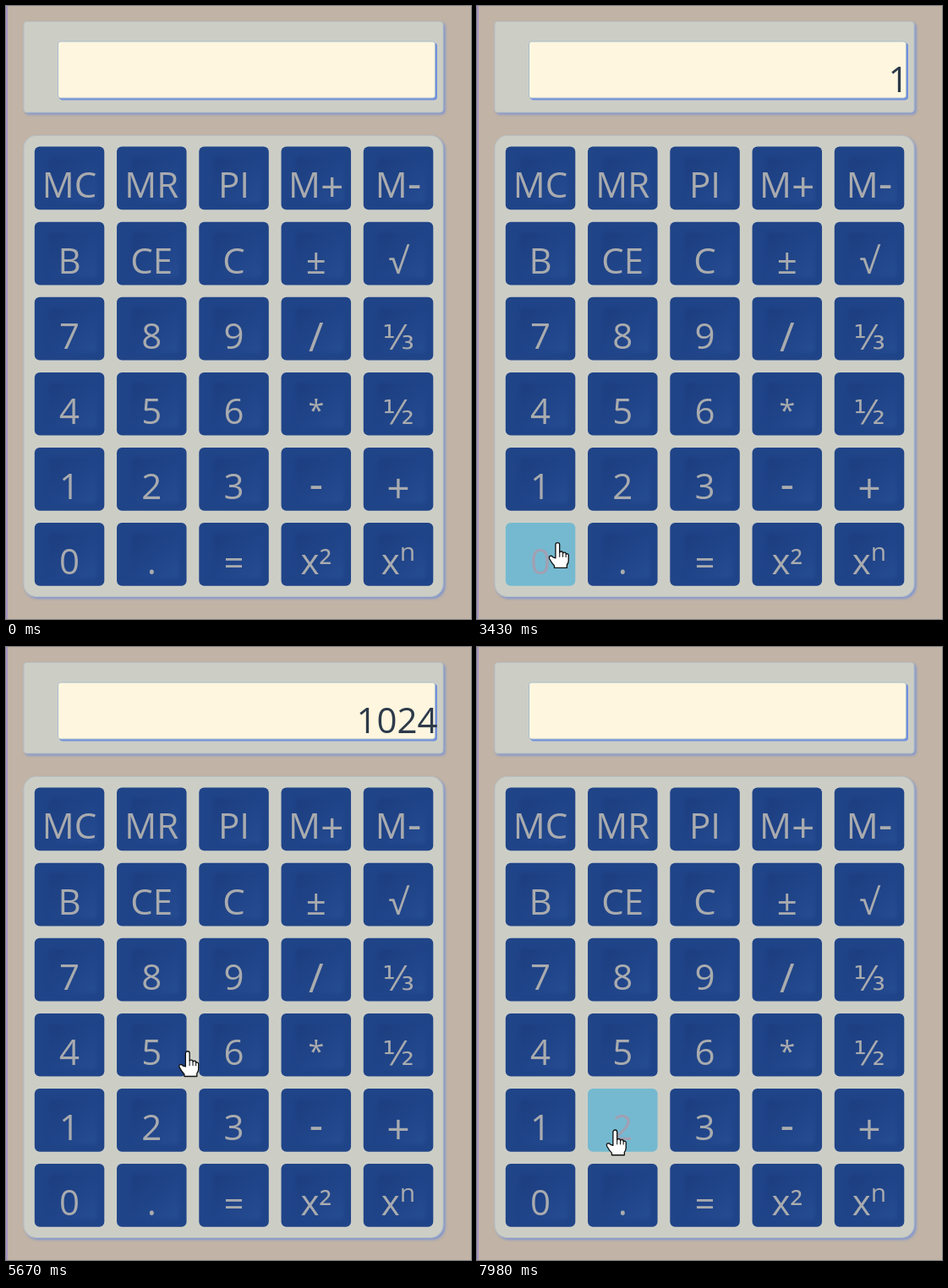
Write an HTML page that moves like this. It is 550 by 726 pixels and loops after 8 s.

```html
<!DOCTYPE html>
<html lang="en">
<head>
<meta charset="utf-8">
<title>Calculator</title>
<style>
  html, body { margin: 0; width: 100%; height: 100%; overflow: hidden; background: #c1b3a5; }
  svg { display: block; width: 100%; height: 100%; font: 42px "Open Sans", "Noto Sans", sans-serif; }
  .panel { fill: #cccec6; stroke: #b9c0c2; stroke-width: 1.2; filter: drop-shadow(2px 2px 1.5px #7f95cf); }
  .field { fill: #fff6df; stroke: #a9bccb; filter: drop-shadow(2px 2px .6px #7290dc); }
  .key { text-anchor: middle; fill: #a9abae; }
  .fraction { font: 39px "DejaVu Sans", sans-serif; }
  .face { fill: #204488; }
  .well { fill: url(#well); filter: blur(2px); }
  .hover { fill: #a29fb2; }
  .hover .face { fill: #75b9d0; }
  .active { fill: #a3b6c6; }
  .active .face { fill: #b1d5e9; filter: drop-shadow(0 0 2px #c3d8e4); }
  .hover .well, .active .well { fill: none; }
</style>
</head>
<body>
<svg viewBox="0 0 550 726" preserveAspectRatio="none">
  <defs>
    <linearGradient id="well" x2="1" y2="1">
      <stop stop-color="#1c3e80"/><stop offset=".5" stop-color="#204488"/><stop offset="1" stop-color="#264c92"/>
    </linearGradient>
  </defs>
  <rect width="550" height="726" fill="#c1b3a5"/>
  <rect width="2" height="726" fill="#a595c3"/>
  <rect class="panel" x="21" y="18.5" width="496" height="107.5" rx="4"/>
  <rect class="panel" x="21" y="153.5" width="496" height="546" rx="15"/>
  <rect class="field" x="61.5" y="42" width="446" height="67" rx="3"/>
  <text id="display" x="510.5" y="101.5" text-anchor="end" fill="#2c3a4a"></text>
  <g id="keys"></g>
  <g id="hand" fill="#fff" stroke="#111" stroke-width="1.4" stroke-linejoin="round">
    <path d="M-2.5 19V2.5a2.5 2.5 0 0 1 5 0V12a2.4 2.4 0 0 1 4 0v1a2.3 2.3 0 0 1 3.8 0v1.3a1.9 1.9 0 0 1 3.2 1.2V22q0 3-2 5.5V31H-4V28.5q-3-3-6-8.5q-1-3 1-3.5t3.5 1.5z"/>
    <path d="M2.5 12v6M6.5 13v5M10.3 14.3v4" stroke-width="1.1"/>
  </g>
</svg>
<script>
const LOOP = 8000, STEP = 70, PRESS = 140;
const KEY_W = 82.5, KEY_H = 74.7;
const $ = id => document.getElementById(id);

const labels = 'MC MR PI M+ M- B CE C ± √ 7 8 9 / ⅓ 4 5 6 * ½ 1 2 3 - + 0 . = x² xn'.split(' ');
// symbols with their own size and vertical shift
const symbols = { '+': [48, 4], '-': [52, 0.5], '/': [48, 3], '*': [34, -4], '=': [42, 1.5], n: [30, -16] };

function setSymbol(char) {
  const [size, dy] = symbols[char];
  return `<tspan font-size="${size}" dy="${dy}">${char}</tspan>`;
}

const keys = labels.map((label, i) => {
  const x = 33.8 + (i % 5) * 97.25, y = 166.6 + Math.floor(i / 5) * 89.1;
  const g = document.createElementNS('http://www.w3.org/2000/svg', 'g');
  const type = /[½⅓]/.test(label) ? 'fraction' : '';
  g.innerHTML =
    `<rect class="face" x="${x}" y="${y}" width="${KEY_W}" height="${KEY_H}" rx="6"/>` +
    `<rect class="well" x="${x + 17}" y="${y + 12}" width="57" height="54" rx="5"/>` +
    `<text class="${type}" x="${x + KEY_W / 2}" y="${y + 60.8}">${label.replace(/[-+/*=n]/, setSymbol)}</text>`;
  $('keys').append(g);
  return { g, label, x, y };
});

// pointer: where it appears, then each glide from depart to arrive
const entry = { time: 840, x: 205, y: 339 };
const glides = [
  { depart: 910, arrive: 1540, x: 205, y: 432 },
  { depart: 1610, arrive: 2450, x: 71, y: 555 },
  { depart: 3080, arrive: 3500, x: 98, y: 642 },
  { depart: 3850, arrive: 4130, x: 157, y: 550 },
  { depart: 4480, arrive: 5040, x: 84, y: 461 },
  { depart: 5460, arrive: 5950, x: 418, y: 506 },
  { depart: 5950, arrive: 6440, x: 365, y: 381 },
  { depart: 7070, arrive: 7980, x: 164, y: 572 }
];
const pressTimes = [2800, 3710, 4200, 5250, 6860];

const smooth = u => u * u * (3 - 2 * u);
const clamp = u => Math.min(1, Math.max(0, u));

function pointerAt(t) {
  let { x, y } = entry;
  for (const g of glides) {
    const k = smooth(clamp((t - g.depart) / (g.arrive - g.depart)));
    x += (g.x - x) * k;
    y += (g.y - y) * k;
  }
  return { x, y };
}

const keyUnder = p => keys.find(k =>
  p.x >= k.x && p.x <= k.x + KEY_W && p.y >= k.y && p.y <= k.y + KEY_H);

// digits add up, an operator empties the display
function displayAt(t) {
  return pressTimes.filter(at => t >= at + STEP)
    .map(at => keyUnder(pointerAt(at)).label)
    .reduce((text, label) => /\d/.test(label) ? text + label : '', '');
}

function draw(now) {
  const t = Math.floor((now % LOOP) / STEP) * STEP;
  const shown = t >= entry.time;
  const p = pointerAt(t);
  const target = shown && keyUnder(p);
  const state = pressTimes.some(at => t >= at && t < at + PRESS) ? 'active' : 'hover';

  $('hand').setAttribute('visibility', shown ? 'visible' : 'hidden');
  $('hand').setAttribute('transform', `translate(${p.x - 0.7} ${p.y}) scale(.96)`);
  for (const key of keys) key.g.setAttribute('class', key === target ? `key ${state}` : 'key');
  $('display').textContent = displayAt(t);
}

const start = performance.now();
function tick() {
  draw(performance.now() - start);
  requestAnimationFrame(tick);
}
tick();
</script>
</body>
</html>
```
